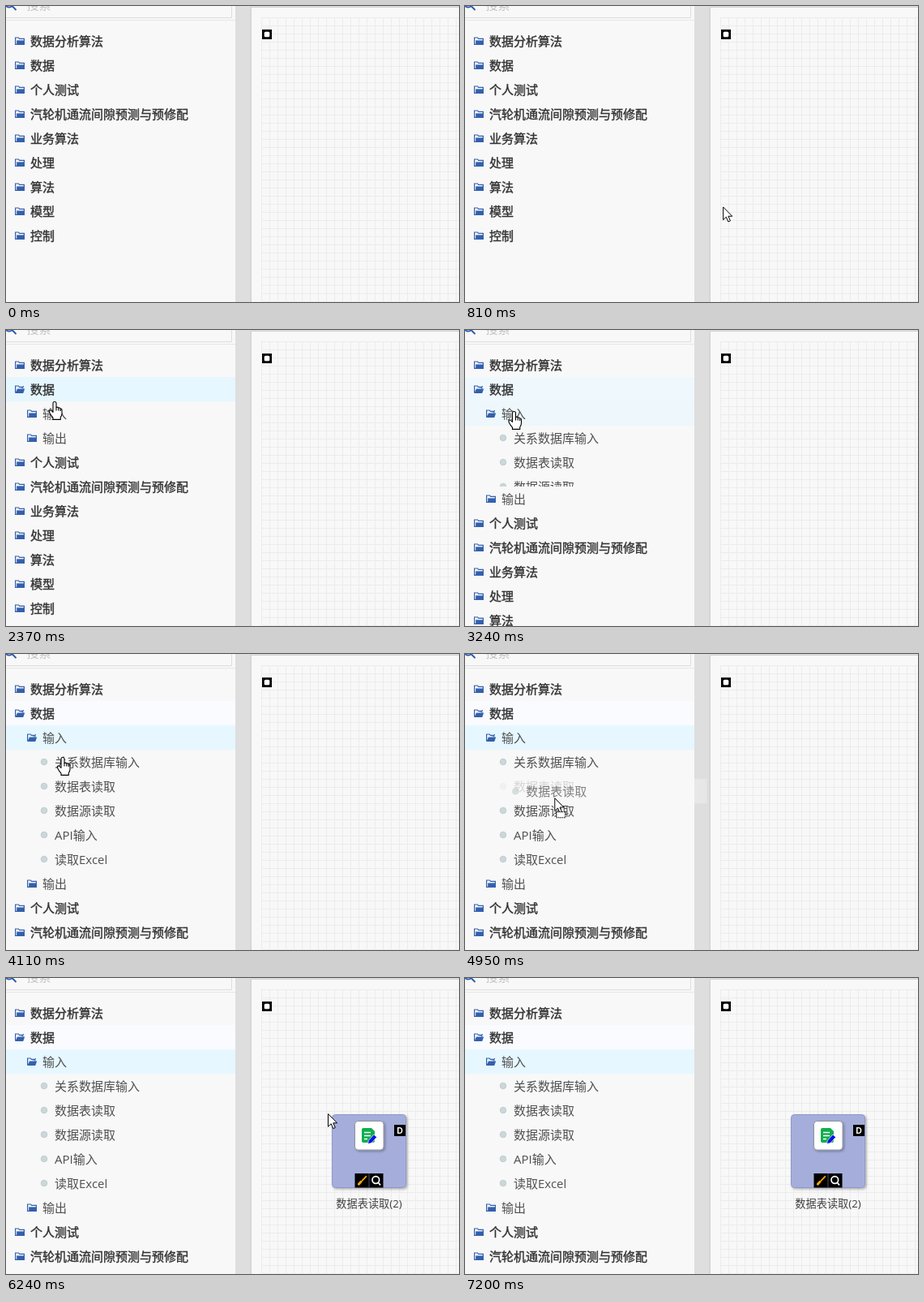
These frames come from a looping animation (559 by 365 pixels, 8130 ms). An HTML page:

```html
<!DOCTYPE html>
<html lang="zh">
<head>
<meta charset="utf-8">
<title>拖放节点</title>
<style>
html, body { margin: 0; width: 100%; height: 100%; overflow: hidden; background: #f8f8f8; }
svg { display: block; }
text { font-family: "Open Sans", "Noto Sans CJK SC", "Noto Sans CJK", sans-serif; font-size: 15px; fill: #505050; }
.top { fill: #333; stroke: #333; stroke-width: .4px; }
</style>
</head>
<body>
<svg id="stage" width="559" height="365" viewBox="0 0 559 365">
  <defs>
    <pattern id="grid" x="315" y="14" width="10" height="10" patternUnits="userSpaceOnUse">
      <path d="M.5 0V10M0 .5H10" stroke="#ececec" fill="none"/>
    </pattern>
    <linearGradient id="fade">
      <stop offset="0" stop-color="#f8f8f8"/>
      <stop offset=".6" stop-color="#f8f8f8"/>
      <stop offset="1" stop-color="#f8f8f8" stop-opacity=".4"/>
    </linearGradient>
    <filter id="shadow" x="-20%" y="-20%" width="150%" height="150%">
      <feDropShadow dx="1.5" dy="1.5" stdDeviation="1.5" flood-opacity=".3"/>
    </filter>
    <g id="closed">
      <path d="M.6 .6H4.5L5.6 2H11.4V9H.6Z" fill="#f8f8f8" stroke="#3460ad" stroke-width="1.2"/>
      <path d="M2.2 4H11.5V9H2.2Z" fill="#3460ad"/>
    </g>
    <g id="open">
      <path d="M.6 9V.6H4.3L5.4 2H9.8V4" fill="none" stroke="#3460ad" stroke-width="1.2"/>
      <path d="M3 4H12.2L10.2 9.6H.4Z" fill="#3460ad"/>
      <path d="M7.5 3.2L11 .8" stroke="#3460ad"/>
    </g>
    <circle id="dot" r="3.8" fill="#cbd7d8" stroke="#b9c8c9" stroke-width=".8"/>
  </defs>

  <rect width="559" height="365" fill="#f8f8f8"/>
  <rect x="283" width="276" height="365" fill="#dedede"/>
  <rect x="301.5" y="1" width="260" height="366" fill="#d2d2d2"/>
  <rect x="303" y="2" width="256" height="363" fill="#f8f8f8"/>
  <rect x="315" y="14" width="244" height="351" fill="url(#grid)"/>
  <rect x="316" y="29" width="12" height="12"/>
  <rect x="318.7" y="31.7" width="6.6" height="6.6" rx="1.5" fill="#fff"/>

  <path d="M0 14.5H278.5V0" fill="none" stroke="#dcdcdc"/>
  <path d="M0 17.5H283" stroke="#e6e6e6"/>
  <g fill="none" stroke="#2c5caa" stroke-width="2">
    <circle cx="4" cy="-3.5" r="5"/><path d="M7.5 0L12.5 5"/>
  </g>
  <text x="25.5" y="3.5" style="fill:#c3c3c3">搜索</text>

  <rect id="tint" y="58" width="283" height="30" fill="#f9fbff"/>
  <g id="tree"></g>

  <g id="node">
    <rect x="402.5" y="168.5" width="91" height="90" rx="4" fill="#a5aedb" stroke="#8d98c8" filter="url(#shadow)"/>
    <rect x="430.5" y="176.5" width="35.5" height="35.5" rx="4" fill="#fff" stroke="#8f949f" filter="url(#shadow)"/>
    <path d="M441 185H451L455 189V201Q455 203 453 203H441Q439 203 439 201V187Q439 185 441 185Z" fill="#0fae4d"/>
    <path d="M442 190.5H450M442 194.5H450M442 198.5H446" stroke="#fff" stroke-width="1.4"/>
    <path d="M446.5 204.5L447.4 200.3L454 193L457.6 196.3L450.8 203.6Z" fill="#0b12e8" stroke="#fff" stroke-width=".7"/>
    <rect x="479" y="181" width="14" height="14"/>
    <text x="486" y="191.8" text-anchor="middle" style="font:bold 10.5px Inter,sans-serif;fill:#fff">D</text>
    <rect x="430.5" y="241" width="35" height="17.5"/>
    <path d="M448 241V258.5" stroke="#5d6079" stroke-width=".8"/>
    <g id="brush" stroke-linecap="round">
      <path d="M444.3 244.8L439.5 249.8" stroke-width="1.8"/>
      <path d="M438 251.3L435.3 254.3" stroke-width="2.8"/>
    </g>
    <g fill="none" stroke="#fff" stroke-width="1.7"><circle cx="456.3" cy="249" r="4.3"/><path d="M459.3 252.2L462 255.4"/></g>
    <text x="448" y="283" text-anchor="middle" style="font-size:13.2px;fill:#404040">数据表读取(2)</text>
  </g>

  <g id="ghost">
    <rect y="148" width="283" height="30" fill="url(#fade)" opacity=".8"/>
    <g opacity=".7">
      <use href="#dot" x="47" y="163"/>
      <text x="60" y="168.5">数据表读取</text>
    </g>
  </g>

  <g id="hand" stroke="#000" stroke-width="1.1" stroke-linejoin="round" fill="#fff">
    <path d="M-2 2Q-2 .5 0 .5Q2 .5 2 2V7.5Q3.6 6.6 4.8 8.1Q6.3 7.3 7.2 9.1Q9 8.8 9 11V15Q9 17.4 7.3 19.5V22.4H-2V20.2Q-4.2 17.8 -6.1 14.2Q-7.2 11.6 -5.8 11Q-4.3 10.6 -2 13.4Z"/>
    <path d="M2 7.5V11.5M4.8 8.2V11.5M7.2 9.2V12" fill="none"/>
  </g>
  <g id="arrow">
    <path d="M.5 .5V16.3L4.2 12.8L6.7 18.6L9.3 17.5L6.8 11.8H11.6Z" fill="#fff" stroke="#000"/>
    <g id="badge">
      <rect x="2.5" y="17.5" width="11" height="7" fill="#fff"/>
      <rect x="2.5" y="17.5" width="11" height="7" fill="none" stroke="#000" stroke-width="1.2" stroke-dasharray="1.5 .8"/>
    </g>
  </g>
</svg>
<script>
const LOOP = 8130, STEP = 30, ROW = 30;
const $ = id => document.getElementById(id);
const show = (id, on) => $(id).setAttribute("display", on ? "inline" : "none");
const move = (id, x, y) => $(id).setAttribute("transform", `translate(${x} ${y})`);
const fade = (id, opacity) => $(id).setAttribute("opacity", opacity);

// One tree row whose top edge is at y; depth 2 rows are leaves.
function row(label, y, depth, id) {
  const x = [11, 26, 47][depth], tx = [30, 45, 60][depth];
  const back = id ? `<rect id="${id}Back" y="${y}" width="283" height="30" fill="#e6f7ff"/>` : "";
  const use = (name, key) => `<use ${key ? `id="${id}${key}"` : ""} href="#${name}" x="${x}" y="${y + 10.4}"/>`;
  const icon = depth == 2 ? `<use href="#dot" x="${x}" y="${y + 15}"/>`
    : id ? use("closed", "Closed") + use("open", "Open") : use("closed");
  return `${back}${icon}<text class="${depth ? "sub" : "top"}" x="${tx}" y="${y + 20.5}">${label}</text>`;
}
const rows = (labels, depth) => labels.map((s, i) => row(s, i * ROW, depth)).join("");

$("tree").innerHTML = row("数据分析算法", 28, 0) + row("数据", 58, 0, "data") +
  `<svg id="dataKids" y="88" width="283">${row("输入", 0, 1, "input")}
    <svg id="inputKids" y="30" width="283">${rows(["关系数据库输入", "数据表读取", "数据源读取", "API输入", "读取Excel"], 2)}</svg>
    <g id="output">${row("输出", 0, 1)}</g></svg>
  <g id="rest">${rows(["个人测试", "汽轮机通流间隙预测与预修配", "业务算法", "处理", "算法", "模型", "控制"], 0)}</g>`;

// Pointer journeys as [time, x, y]; the pointer rests between them.
const trips = [
  [[480, 553, 258], [720, 400, 250], [960, 180, 232], [1140, 100, 150], [1290, 56.5, 77]],
  [[1290, 56.5, 77], [1500, 48, 69]],
  [[2130, 48, 69], [2370, 60, 88], [2460, 60, 95]],
  [[2580, 60, 95], [2610, 60.5, 97]],
  [[2760, 60.5, 97], [2910, 60.5, 100]],
  [[3840, 60.5, 100], [4110, 70, 127], [4350, 82, 151], [4590, 90.5, 168]],
  [[4860, 91, 168], [5040, 150, 189], [5200, 245, 187], [5370, 340, 168], [5550, 384, 160], [5730, 397, 167]],
  [[6600, 397, 167], [6780, 430, 125], [6960, 490, 148], [7170, 556, 188]]
];

function slope(path, i, k) {
  const a = path[i - 1], b = path[i + 1];
  return a && b ? (b[k] - a[k]) / (b[0] - a[0]) : 0;
}

function pointer(t) {
  const path = trips.filter(p => p[0][0] <= t).pop() || trips[0];
  const end = path[path.length - 1];
  if (t >= end[0]) return end.slice(1);
  const i = Math.max(0, path.findIndex(p => p[0] > t) - 1);
  const a = path[i], b = path[i + 1], d = b[0] - a[0];
  const u = Math.max(0, (t - a[0]) / d), v = 1 - u;
  return [1, 2].map(k => a[k] * v * v * (1 + 2 * u) + b[k] * u * u * (3 - 2 * u) +
    d * u * v * (slope(path, i, k) * v - slope(path, i + 1, k) * u));
}

function ease(t, from, to) {
  const u = Math.min(1, Math.max(0, (t - from) / (to - from)));
  return u * u * (3 - 2 * u);
}

function draw(t) {
  const first = ease(t, 1710, 1950), second = ease(t, 3060, 3420);
  const inner = 5 * ROW * second, outer = 2 * ROW * first + inner;
  $("dataKids").setAttribute("height", outer);
  $("inputKids").setAttribute("height", inner);
  show("dataKids", outer > 0);
  show("inputKids", inner > 0);
  move("output", 0, ROW + inner);
  move("rest", 0, 88 + outer);
  fade("dataBack", first * (1 - second));
  fade("tint", second);
  fade("inputBack", second);
  for (const [id, at] of [["data", 1740], ["input", 3090]]) {
    show(id + "Closed", t < at);
    show(id + "Open", t >= at);
  }

  const [x, y] = pointer(t);
  const dragging = t >= 4890 && t < 5970;
  const visible = t >= 480 && t < 7200;
  const hand = x < 283 && !dragging;
  show("hand", visible && hand);
  show("arrow", visible && !hand);
  show("badge", dragging);
  show("ghost", dragging);
  move("hand", x, y);
  move("arrow", x, y);
  move("ghost", x - 95, y - 171);

  show("node", t >= 5970);
  $("brush").setAttribute("stroke", t < 6240 ? "#fff" : "#f7a708");
}

const start = performance.now();
function tick() {
  const t = (performance.now() - start) % LOOP;
  draw(Math.floor(t / STEP) * STEP);
  requestAnimationFrame(tick);
}
tick();
</script>
</body>
</html>
```
